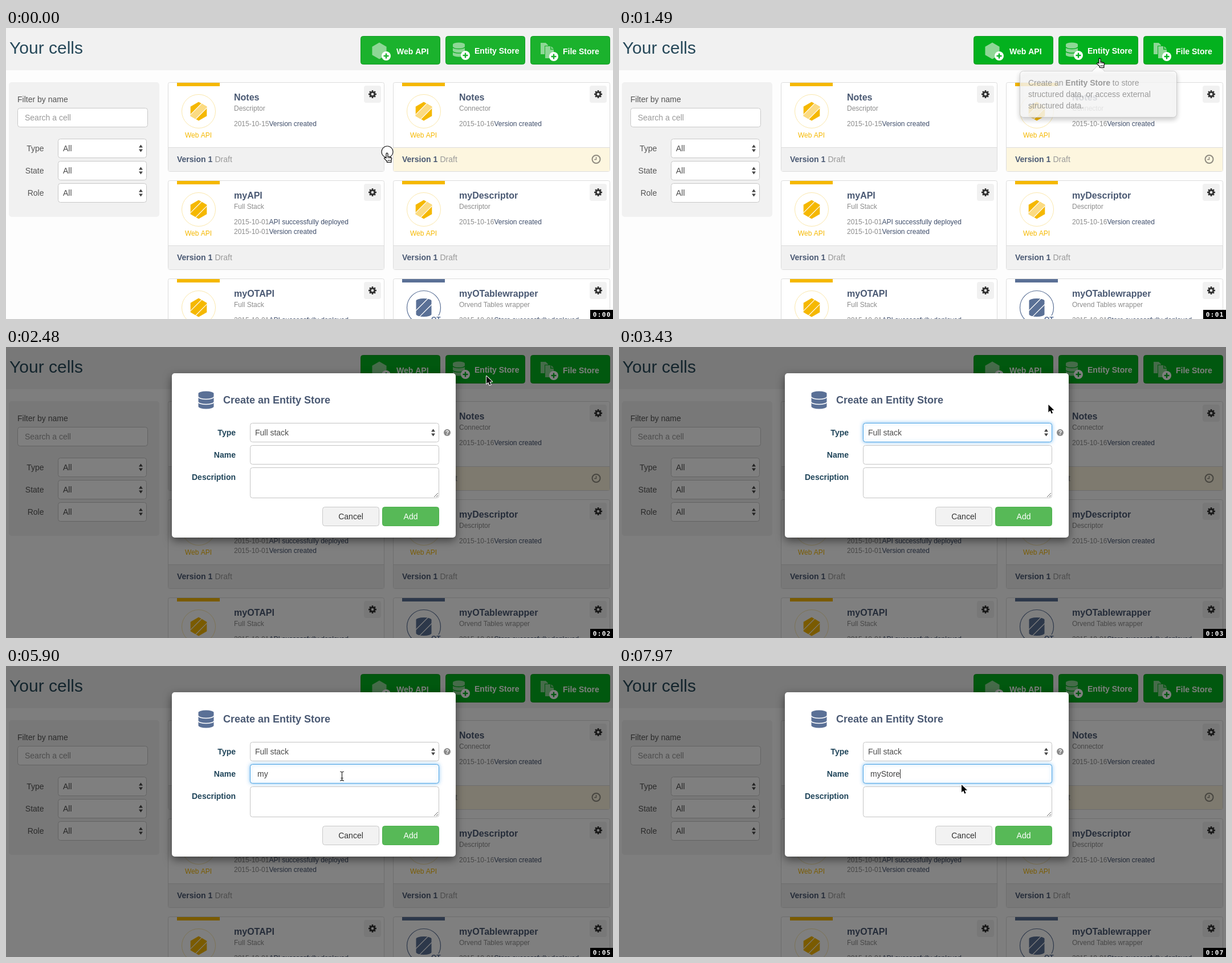
Write an HTML page with a canvas that moves like this. It is 1065 px wide and 510 px high and loops after 8000 ms.

```html
<!DOCTYPE html>
<html lang="en">
<head>
<meta charset="utf-8">
<title>Your cells</title>
<style>
  html, body { margin: 0; width: 1065px; height: 510px; overflow: hidden; }
  canvas { display: block; }
</style>
</head>
<body>
<canvas id="stage" width="1065" height="510"></canvas>
<script>
const ctx = document.getElementById('stage').getContext('2d');
const LOOP = 8000;
const SANS = '"Liberation Sans", Arial, sans-serif';
const YELLOW = '#f5b800', BLUE = '#5a7096', TITLE = '#4a5973', MUTED = '#8c8c8c';

// Value of the last [time, value] pair already reached.
const at = (t, pairs) => pairs.reduce((v, [time, next]) => (t >= time ? next : v), 0);

// ---------- drawing helpers ----------
function text(str, x, y, size, color, { bold = false, align = 'left' } = {}) {
  ctx.font = `${bold ? 'bold ' : ''}${size}px ${SANS}`;
  ctx.fillStyle = color;
  ctx.textAlign = align;
  ctx.fillText(str, x, y);
}

function box(x, y, w, h, r, fill, border) {
  const o = border ? 0.5 : 0;
  ctx.beginPath();
  ctx.roundRect(x + o, y + o, w - 2 * o, h - 2 * o, r);
  ctx.fillStyle = fill;
  ctx.fill();
  if (border) stroke(border, 1);
}

function stroke(color, width) {
  ctx.strokeStyle = color;
  ctx.lineWidth = width;
  ctx.stroke();
}

function poly(points, fill) {
  ctx.beginPath();
  points.forEach(([x, y]) => ctx.lineTo(x, y));
  ctx.closePath();
  ctx.fillStyle = fill;
  ctx.fill();
}

function line(x1, y1, x2, y2, color, width) {
  ctx.beginPath();
  ctx.moveTo(x1, y1);
  ctx.lineTo(x2, y2);
  stroke(color, width);
}

function circle(x, y, r, fill, border, width = 1) {
  ctx.beginPath();
  ctx.arc(x, y, r, 0, 7);
  if (fill) { ctx.fillStyle = fill; ctx.fill(); }
  if (border) stroke(border, width);
}

function shadowed(color, blur, dy, draw) {
  ctx.save();
  ctx.shadowColor = color;
  ctx.shadowBlur = blur;
  ctx.shadowOffsetY = dy;
  draw();
  ctx.restore();
}

const hexPoints = (x, y, r) => [0, 1, 2, 3, 4, 5].map(i => {
  const a = Math.PI * (i / 3 - 0.5);
  return [x + r * Math.cos(a), y + r * Math.sin(a)];
});

function cylinder(x, y, w, h, fill, gap) {
  const rx = w / 2, ry = w / 6.5, top = y - h / 2 + ry, bottom = y + h / 2 - ry;
  ctx.beginPath();
  ctx.ellipse(x, top, rx, ry, 0, Math.PI, 2 * Math.PI);
  ctx.ellipse(x, bottom, rx, ry, 0, 0, Math.PI);
  ctx.closePath();
  ctx.fillStyle = fill;
  ctx.fill();
  if (!gap) return;
  for (const f of [0.25, 0.65]) {
    ctx.beginPath();
    ctx.ellipse(x, top + (bottom - top) * f, rx, ry, 0, 0, Math.PI);
    stroke(gap, 1.5);
  }
}

// ---------- page ----------
function slashes(x, y, band) {
  ctx.save();
  ctx.translate(x, y);
  ctx.rotate(-Math.PI / 4);
  if (band) { ctx.fillStyle = band; ctx.fillRect(-24, -6, 48, 12); }
  for (const dy of [-6, 6]) line(-24, dy, 24, dy, '#fff', 1.2);
  ctx.restore();
}

function hexIcon(x, y, band) {
  circle(x, y, 29.5, '#fff', '#fbe8ac');
  ctx.save();
  poly(hexPoints(x, y, 16.5), YELLOW);
  ctx.clip();
  slashes(x, y, band);
  ctx.restore();
}

function storeIcon(x, y) {
  circle(x, y, 29.5, '#fff', BLUE, 1.2);
  cylinder(x, y, 27, 32, BLUE);
  slashes(x, y);
  ctx.fillStyle = '#fff';
  ctx.fillRect(x + 11, y + 14, 22, 8);
  text('OT', x + 13, y + 25, 12, BLUE, { bold: true });
}

function gear(x, y) {
  circle(x, y, 3.8, null, '#333', 3);
  for (let i = 0; i < 8; i++) {
    const a = i * Math.PI / 4, c = Math.cos(a), s = Math.sin(a);
    line(x + 4.5 * c, y + 4.5 * s, x + 7 * c, y + 7 * s, '#333', 2.6);
  }
}

function card({ col, row, title, kind, events, icon, pending }) {
  const x = col ? 679 : 284, y = 95 + 172 * row, w = 380 + col;
  box(x, y, w, 157, 3, '#fff', '#dcdcdc');
  ctx.fillStyle = pending ? '#fdf6df' : '#f1f1f1';
  ctx.fillRect(x + 1, y + 115, w - 2, 41);
  line(x, y + 114.5, x + w, y + 114.5, '#dcdcdc', 1);
  ctx.fillStyle = icon === 'store' ? BLUE : YELLOW;
  ctx.fillRect(x + 16, y + 1, 75, 6);

  if (icon === 'store') storeIcon(x + 54, y + 51);
  else hexIcon(x + 54, y + 51, icon === 'band' ? '#fbdb82' : null);
  if (icon !== 'store') text('Web API', x + 53.5, y + 97, 12, YELLOW, { align: 'center' });

  text(title, x + 116, y + 32, 16, TITLE, { bold: true });
  text(kind, x + 116, y + 50, 12, MUTED);
  events.forEach(([date, label], i) => {
    text(date, x + 116, y + 77 + 17 * i, 12, MUTED);
    text(label, x + 177.5, y + 77 + 17 * i, 12, '#3f4e6b');
  });
  text('Version 1', x + 16, y + 140, 14, TITLE, { bold: true });
  text('Draft', x + 82.5, y + 140, 14, '#999');

  box(x + w - 36, y + 6, 30, 30, 4, '#f1f1f1');
  gear(x + w - 21, y + 21);
  if (pending) {
    circle(x + 356.5, y + 135, 7, null, '#8f8b80', 2);
    line(x + 356.5, y + 131, x + 356.5, y + 136, '#8f8b80', 1.5);
    line(x + 357, y + 135.5, x + 353, y + 135.5, '#8f8b80', 1.5);
  }
}

const created = d => [`2015-10-${d}`, 'Version created'];
const deployed = what => ['2015-10-01', `${what} successfully deployed`];
const cards = [
  { col: 0, row: 0, title: 'Notes', kind: 'Descriptor', icon: 'band', events: [created(15)] },
  { col: 1, row: 0, title: 'Notes', kind: 'Connector', icon: 'band', events: [created(16)], pending: true },
  { col: 0, row: 1, title: 'myAPI', kind: 'Full Stack', icon: 'solid', events: [deployed('API'), created('01')] },
  { col: 1, row: 1, title: 'myDescriptor', kind: 'Descriptor', icon: 'band', events: [created(16)] },
  { col: 0, row: 2, title: 'myOTAPI', kind: 'Full Stack', icon: 'solid', events: [deployed('API')] },
  { col: 1, row: 2, title: 'myOTablewrapper', kind: 'Orvend Tables wrapper', icon: 'store', events: [deployed('Store')] },
];

function select(x, y, w, label) {
  box(x, y, w, 34, 4, '#fff', '#c8c8c8');
  selectLabel(x, y, w, label);
}

function selectLabel(x, y, w, label) {
  text(label, x + 9, y + 22, 14, '#4d4d4d');
  const ax = x + w - 10.5, ay = y + 17;
  poly([[ax - 3.5, ay - 1.5], [ax, ay - 6.5], [ax + 3.5, ay - 1.5]], '#444');
  poly([[ax - 3.5, ay + 1.5], [ax, ay + 6.5], [ax + 3.5, ay + 1.5]], '#444');
}

function plusBadge(x, y, green) {
  circle(x, y, 8, '#fff');
  line(x - 4.5, y, x + 4.5, y, green, 2.4);
  line(x, y - 4.5, x, y + 4.5, green, 2.4);
}

function addButtons(green, focused) {
  const pale = '#8ed796';
  if (focused) {
    shadowed('#3b8df5', 5, 0, () => box(769.5, 12.5, 143, 53, 5, '#4d98f0'));
  }
  for (const x of [622, 771, 920]) box(x, 14, 140, 50, 4, green, focused && x === 771 ? '#2d84c4' : '#119a22');

  poly(hexPoints(655, 40, 14.5), pale);
  plusBadge(667, 49, green);
  text('Web API', 685, 46, 14, '#fff', { bold: true });

  cylinder(794.5, 38, 21, 25, pale, green);
  plusBadge(806, 48, green);
  text('Entity Store', 822, 45, 14, '#fff', { bold: true });

  poly([[938, 26], [947, 26], [951, 30], [951, 46], [938, 46]], pale);
  poly([[945, 31], [956, 31], [962, 37], [962, 54], [945, 54]], green);
  poly([[946, 32], [955, 32], [955, 38], [961, 38], [961, 53], [946, 53]], pale);
  poly([[956.5, 32], [961, 36.5], [956.5, 36.5]], pale);
  plusBadge(961, 50, green);
  text('File Store', 977, 46, 14, '#fff', { bold: true });
}

function page(t) {
  ctx.fillStyle = '#fdfdfd';
  ctx.fillRect(0, 0, 1065, 510);
  ctx.fillStyle = '#f1f1f1';
  ctx.fillRect(0, 0, 1065, 74);
  text('Your cells', 6, 45, 30, '#264859');
  addButtons(t < 770 ? '#1bb22d' : '#03b11e', t >= 1880 && t < 2480);

  box(5, 95, 264, 236, 5, '#f1f1f1');
  text('Filter by name', 20, 130, 14, '#555');
  box(20, 140, 229, 34, 4, '#fff', '#c8c8c8');
  text('Search a cell', 33, 162, 14, '#999');
  ['Type', 'State', 'Role'].forEach((label, i) => {
    text(label, 66.5, 216 + 39 * i, 14, '#555', { align: 'right' });
    select(91, 194 + 39 * i, 156, 'All');
  });
  cards.forEach(card);
}

function tooltip(alpha) {
  if (!alpha) return;
  ctx.save();
  ctx.globalAlpha = alpha;
  shadowed('rgba(0,0,0,.25)', 8, 4, () => box(703, 75, 276, 82, 6, '#fff', '#c6c6c6'));
  poly([[830, 76.5], [841, 65.5], [852, 76.5]], '#fff');
  line(830, 75.5, 841, 65, '#c6c6c6', 1);
  line(841, 65, 852, 75.5, '#c6c6c6', 1);
  const color = '#858585';
  text('Create an ', 718, 101, 14, color);
  let x = 718 + ctx.measureText('Create an ').width;
  text('Entity Store', x, 101, 14, color, { bold: true });
  x += ctx.measureText('Entity Store').width;
  text(' to store', x, 101, 14, color);
  text('structured data, or access external', 718, 121, 14, color);
  text('structured data.', 718, 141, 14, color);
  ctx.restore();
}

// ---------- dialog ----------
function field(y, h, focus) {
  box(428, y, 332, h, 4, '#fff', '#c4c4c4');
  if (!focus) return;
  ctx.save();
  ctx.globalAlpha = focus;
  shadowed('rgba(82,168,236,.7)', 6, 0, () => box(428, y, 332, h, 4, '#fff', '#55a9e6'));
  ctx.restore();
}

const keys = [['m', 5000], ['y', 5370], ['S', 5990], ['t', 6170], ['o', 6440], ['r', 6710], ['e', 6790]];

function nameInput(t) {
  const typed = keys.filter(k => t >= k[1]).map(k => k[0]).join('');
  text(typed, 441, 194, 14, '#444');
  const caret = at(t, [[4410, 1], [4920, 0], [5000, 1], [5900, 0], [5990, 1], [7430, 0], [7970, 1]]);
  if (caret) {
    const x = Math.round(441 + ctx.measureText(typed).width) + 0.5;
    line(x, 181, x, 197, '#333', 1);
  }
}

function dialog(t) {
  ctx.fillStyle = 'rgba(0,0,0,.5)';
  ctx.fillRect(0, 0, 1065, 510);
  shadowed('rgba(0,0,0,.5)', 15, 5, () => box(291, 46, 498, 288, 5, '#fff'));
  cylinder(351, 93, 27, 31, BLUE, '#fff');
  text('Create an Entity Store', 381, 99, 18, TITLE, { bold: true });
  ['Type', 'Name', 'Description'].forEach((label, i) =>
    text(label, 403, 155 + 39 * i, 14, '#20455a', { bold: true, align: 'right' }));

  field(133, 34, at(t, [[2710, 0.5], [2890, 1], [4310, 0.5], [4410, 0]]));
  selectLabel(428, 133, 332, 'Full stack');
  circle(774, 150, 6, '#8a8a8a');
  text('?', 774, 153.7, 10, '#fff', { bold: true, align: 'center' });

  field(172, 34, at(t, [[4310, 0.5], [4410, 1]]));
  nameInput(t);

  field(211, 54, 0);
  line(751, 263, 758, 256, '#666', 1);
  line(755, 263, 758, 260, '#666', 1);

  box(555, 280, 100, 34, 4, '#f2f2f2', '#c8c8c8');
  text('Cancel', 605, 302, 14, '#333', { align: 'center' });
  box(660, 280, 100, 34, 4, '#57b957', '#4cae4c');
  text('Add', 710, 302, 14, '#fff', { align: 'center' });
}

// ---------- pointer and clock ----------
const HAND = new Path2D('M4 9.5V2.2a1.5 1.5 0 0 1 3 0V7l5.4 1.2q1.4.5 1.3 2L12.8 14v3H5.5v-2L1 10.6a1.3 1.3 0 0 1 1.6-2z');
const HAND_LINES = new Path2D('M7 7v3M9.3 7.6v2.6M11.5 8.2v2.2M7.5 12.5v2.5M9.2 12.5v2.5M11 12.5v2.5');
const ARROW = new Path2D('M0 0V13.5l3.1-3 2.3 5.3 2.2-1-2.2-5.1H10z');
const IBEAM = new Path2D('M-3.5-8q3 0 3.5 1.5q.5-1.5 3.5-1.5M-3.5 8q3 0 3.5-1.5q.5 1.5 3.5 1.5M0-6.5V6.5M-2 3.5H2');

function glide(t, start, steps, [x1, y1], [x2, y2]) {
  const n = Math.min(Math.max(Math.floor((t - start) / 90) + 1, 0), steps);
  const p = n / steps, e = p * p * (3 - 2 * p);
  return [x1 + (x2 - x1) * e, y1 + (y2 - y1) * e];
}

function pointer(t) {
  const start = [669, 217], button = [844, 51], input = [589.5, 193];
  let [x, y] = t < 2480 ? glide(t, 770, 6, start, button) : glide(t, 3160, 10, button, input);
  let shape = 'arrow';
  if (t < 770 || (t < 2270 && y < 64)) shape = 'hand';
  if (t >= 3160 && x < 760 && y > 172) shape = 'beam';
  if (t >= 7970) { [x, y] = [602, 208]; shape = 'arrow'; }

  const pressed = t < 90 || (t >= 1880 && t < 2060) || (t >= 4310 && t < 4410);
  if (pressed) circle(x, y, 10, 'rgba(255,255,255,.75)', '#222', 1.2);

  ctx.save();
  ctx.lineJoin = 'round';
  if (shape === 'hand') {
    ctx.translate(x - 6, y + 1.5);
    ctx.fillStyle = '#fff';
    ctx.strokeStyle = '#000';
    ctx.lineWidth = 1.2;
    ctx.fill(HAND);
    ctx.stroke(HAND);
    ctx.lineWidth = 0.8;
    ctx.stroke(HAND_LINES);
  } else if (shape === 'arrow') {
    ctx.translate(x - 1, y);
    ctx.strokeStyle = '#fff';
    ctx.lineWidth = 2;
    ctx.stroke(ARROW);
    ctx.fillStyle = '#000';
    ctx.fill(ARROW);
  } else {
    ctx.translate(x, y);
    ctx.strokeStyle = '#222';
    ctx.lineWidth = 1.2;
    ctx.stroke(IBEAM);
  }
  ctx.restore();
}

function clock(t) {
  const second = at(t, [[1220, 1], [2270, 2], [3340, 3], [4310, 4], [5270, 5], [6350, 6], [7330, 7]]);
  ctx.fillStyle = '#000';
  ctx.fillRect(1025, 494, 40, 16);
  ctx.font = 'bold 11px "DejaVu Sans Mono", monospace';
  ctx.textAlign = 'center';
  ctx.fillStyle = '#fff';
  [...`0:0${second}`].forEach((c, i) => ctx.fillText(c, 1033 + 8 * i, 506));
}

function frame() {
  const t = performance.now() % LOOP;
  page(t);
  tooltip(at(t, [[1370, 0.4], [1490, 0.8], [1580, 0.95], [1670, 1], [2060, 0.8], [2150, 0.4], [2270, 0]]));
  if (t >= 2480) dialog(t);
  pointer(t);
  clock(t);
  requestAnimationFrame(frame);
}
frame();
</script>
</body>
</html>
```
